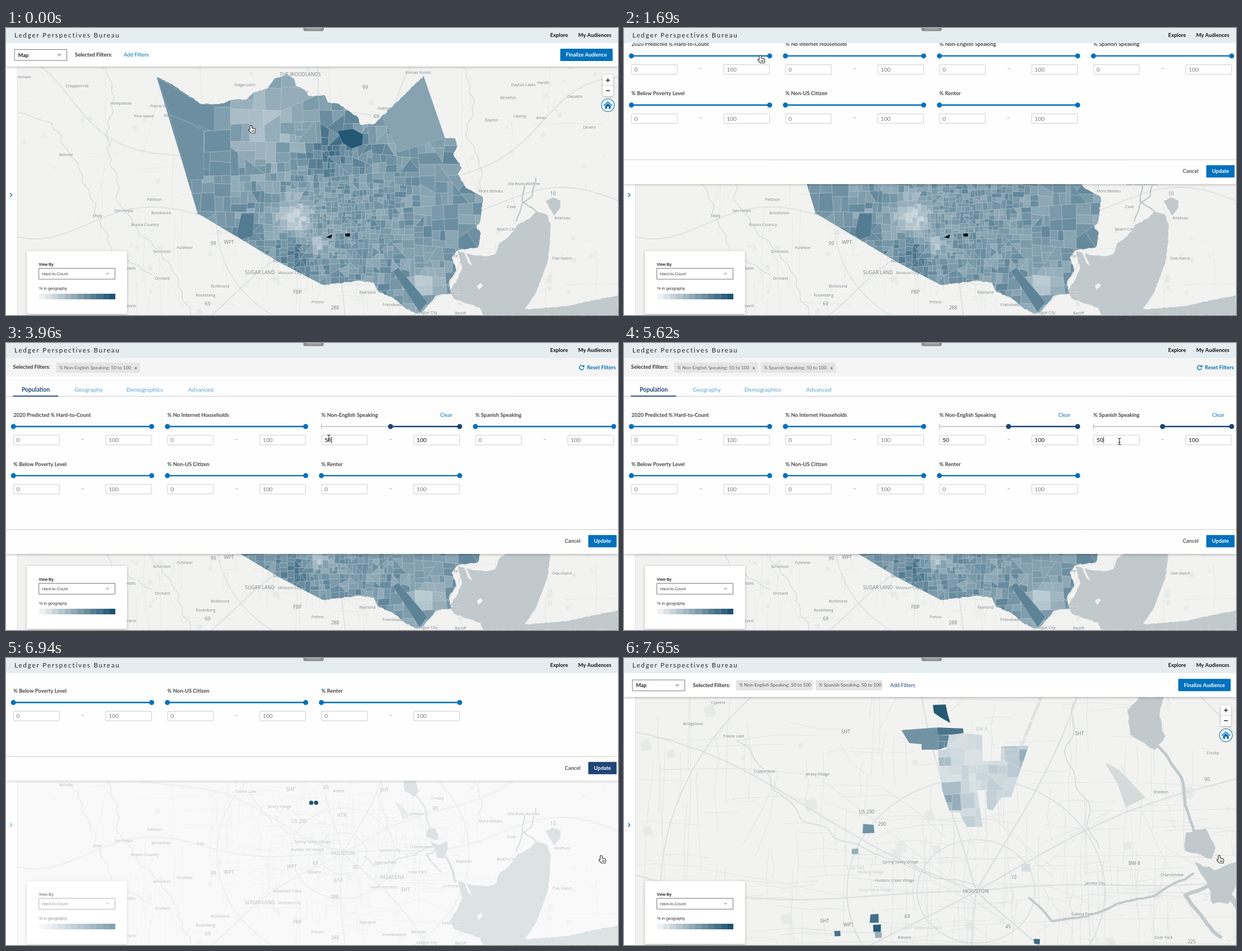
An HTML page with a canvas that plays this animation: 1092 by 513 pixels, repeating every 8000 ms.

```html
<!DOCTYPE html>
<html lang="en">
<head>
<meta charset="utf-8">
<title>Audience map</title>
<style>
html, body { margin: 0; width: 100%; height: 100%; overflow: hidden; background: #fff; }
canvas { display: block; width: 1092px; height: 513px; }
</style>
</head>
<body>
<canvas id="stage"></canvas>
<script>
const W = 1092, H = 513, LOOP = 8000, STEP = 145;
const BLUE = '#0071bc', NAVY = '#1f4478', WATER = '#c1c9cc', LAND = '#f2f3f1';
const LATO = 'Lato, sans-serif', MAPFONT = '"Open Sans", sans-serif', ARIAL = '"Liberation Sans", Arial, sans-serif';
const dpr = window.devicePixelRatio || 1;

function layer(canvas = document.createElement('canvas')) {
  canvas.width = W * dpr;
  canvas.height = H * dpr;
  const c = canvas.getContext('2d');
  c.scale(dpr, dpr);
  return c;
}
const g = layer(document.getElementById('stage'));

let seed = 7;
const rnd = () => (seed = (seed * 16807) % 2147483647) / 2147483647;
const jitter = a => (rnd() - 0.5) * 2 * a;
const pts = s => s.split(' ').map(p => p.split(',').map(Number));
const smooth = k => (k = Math.min(1, Math.max(0, k)), k * k * (3 - 2 * k));

function text(c, s, x, y, size, color, { weight = 400, family = LATO, align = 'left', space = 0 } = {}) {
  c.font = `${weight} ${size}px ${family}`;
  c.letterSpacing = space + 'px';
  c.textAlign = align;
  c.fillStyle = color;
  c.fillText(s, x, y + size * 0.36);
}
const bold = (s, x, y, color = '#333', align = 'left', size = 9.4) =>
  text(g, s, x, y, size, color, { weight: 700, align });

function rect(c, x, y, w, h, fill, stroke, r = 0) {
  c.beginPath();
  c.roundRect(x, y, w, h, r);
  if (fill) { c.fillStyle = fill; c.fill(); }
  if (stroke) { c.strokeStyle = stroke; c.lineWidth = 1; c.stroke(); }
}
function trace(c, p, close) {
  c.beginPath();
  p.forEach(([x, y]) => c.lineTo(x, y));
  if (close) c.closePath();
}
function line(c, p, color, width) {
  trace(c, p);
  c.strokeStyle = color;
  c.lineWidth = width;
  c.lineJoin = c.lineCap = 'round';
  c.stroke();
}
function area(c, p, fill, edge) {
  trace(c, p, true);
  c.fillStyle = fill;
  c.fill();
  if (edge) { c.strokeStyle = edge; c.lineWidth = 0.6; c.stroke(); }
}
function disc(c, x, y, r, fill) {
  c.beginPath();
  c.arc(x, y, r, 0, 7);
  c.fillStyle = fill;
  c.fill();
}
// Subdivides a polyline and shakes it so that it reads as a bank.
function rough(p, amp) {
  const out = [];
  for (let i = 1; i < p.length; i++) {
    const [a, b] = p[i - 1], [x, y] = p[i];
    const n = Math.max(1, Math.round(Math.hypot(x - a, y - b) / 4));
    for (let k = 0; k < n; k++) {
      const t = k / n, j = k ? amp : 0;
      out.push([a + (x - a) * t + jitter(j), b + (y - b) * t + jitter(j)]);
    }
  }
  out.push(p[p.length - 1]);
  return out;
}
const meander = (p, amp) => rough(p, 0.4).map(([x, y], i) =>
  [x + (Math.sin(i * 0.9) + Math.sin(i * 0.37)) * amp, y + Math.cos(i * 0.7) * amp * 0.5]);

function shade(v) {
  v = Math.min(1, Math.max(0, v));
  const a = [238, 241, 242], b = [31, 84, 112];
  return `rgb(${a.map((n, i) => Math.round(n + (b[i] - n) * v))})`;
}

// Places on the wide map. "+" shows only close up, "~" the same but faint, "-" only from afar.
const TOWNS = 'Brenham|30|87;Chappell Hill|127|103;Hempstead|205|134;Prairie View|276|139;Pine Island|246|157;Waller|292|156;Bellville|107|226;Sealy|163|335;San Felipe|210|326;Pattison|265|306;Brookshire|277|330;Katy|347|331;Brazos Country|248|351;Simonton|278|399;Fulshear|319|392;Wallis|222|429;Orchard|279|447;Richmond|382|461;Rosenberg|356|477;Missouri City|506|437;Fresno|556|489;Pearland|645|472;Friendswood|693|494;League City|751|508;Bacliff|811|509;Seabrook|793|473;Webster|737|489;East Bernard|210|496;'
  + 'Stagecoach|426|101;Preserve|525|113;Roman Forest|735|79;Oakhurst|678|143;Dayton Lakes|923|101;Hardin|959|97;Kenefick|896|124;Daisetta|1015|122;Dayton|866|164;Liberty|917|157;Ames|955|160;Devers|1041|177;Old River-Winfree|924|278;Mont Belvieu|865|291;Cove|902|319;Beach City|893|359;Anahuac|993|339;Oak Island|992|411;'
  + 'Crosby|770|250;Sheldon|733|278;Channelview|741|337;Jacinto City|686|343;Baytown|817|363;Galena Park|677|365;Deer Park|735|382;La Porte|793|407;South Houston|674|409;Meadows Place|502|416;Bellaire|550|382;-Bunker Hill Village|538|342;Spring Valley Village|547|328;Jersey Village|488|265;Towne Lake|428|238;-Aldine|594|237;'
  + '+Cypress|417|214;+Bridgeland|399|229;+Copperfield|450|263;+Hunters Creek Village|543|341;~Hedwig Village|526|335;~Piney Point Village|529|348;~West University Place|563|375';
const SIGNS = 'THE WOODLANDS|525|83;HOUSTON|601|349;SUGAR LAND|453|437;PASADENA|689|392;99|641|106;69|661|158;99|370|385;WPT|398|383;FBP|520|472;69|360|493;288|587|500;10|976|296;SHT|508|235;-45|571|231;SHT|675|236;-HTR|599|281;US 290|523|292;90|766|269;69|552|367;WPT|510|373;45|624|374;-610|593|398;288|586|427;SHT|713|414;+290|534|301;+10|628|339;+BW 8|714|329;~BW 8|605|233;~I-10 Toll|515|332;+SHT|493|370;+225|755|385';

// One geography drawn at any zoom around the city centre.
function drawMap(zoom) {
  seed = 7;
  const c = layer(), k = (zoom - 1) / 1.5, close = zoom > 1;
  const hub = [601, 349], at = [601 + 27 * k, 349 + 68 * k];
  const px = (1 + k * 0.3) / zoom;
  c.fillStyle = LAND;
  c.fillRect(0, 0, W, H);
  c.save();
  c.translate(...at);
  c.scale(zoom, zoom);
  c.translate(-hub[0], -hub[1]);

  for (let i = 0; i < 110; i++) {
    const x = rnd() * W, y = 70 + rnd() * 440, s = 2 + rnd() * 6;
    area(c, [[x, y], [x + s, y - s / 3], [x + s * 1.3, y + s * 0.8], [x + s * 0.2, y + s]], '#e7eae8');
  }
  for (let i = 0; i < 420; i++) {
    const spread = i % 4 ? 260 : 620, reach = (i % 4 ? 22 : 60) * (0.4 + rnd());
    const x = hub[0] + (rnd() + rnd() - 1) * spread, y = hub[1] + (rnd() + rnd() - 1) * spread * 0.6;
    const turn = rnd() < 0.85 ? Math.round(rnd()) * Math.PI / 2 + jitter(0.07) : rnd() * 3;
    const dx = Math.cos(turn) * reach, dy = Math.sin(turn) * reach;
    line(c, [[x - dx, y - dy], [x + jitter(3), y + jitter(3)], [x + dx, y + dy]], '#e2e5e5', 0.8 * px);
  }
  for (const angle of [3.16, -2.73, -1.8, -1.1, -0.45, -0.1, 0.78, 1.6, 2.6]) {
    const road = [];
    for (let r = 0; r < 640; r += 20) {
      const a = angle + 0.07 * Math.sin(r / 70 + angle * 5);
      road.push([hub[0] + Math.cos(a) * r, hub[1] + Math.sin(a) * r]);
    }
    line(c, road, '#d5dadb', 1.8 * px);
    line(c, road, '#eceeed', 0.6 * px);
  }
  for (const r of [42, 92, 225]) {
    c.beginPath();
    c.ellipse(hub[0], hub[1], r, r * 0.88, 0, 0, 7);
    c.strokeStyle = '#dbdfe0';
    c.lineWidth = 1.4 * px;
    c.stroke();
  }

  ['172,68 193,110 185,165 180,215 197,265 200,310 236,362 292,420 330,513', '20,150 80,170 130,250 190,400 260,440',
    '815,68 835,130 822,190 850,250 842,290', '430,240 480,300 560,335 600,345', '670,200 668,260 690,320']
    .forEach(p => line(c, meander(pts(p), 2.2), '#cfd6d8', 1.1 * px));
  area(c, rough(pts('806,398 832,406 858,408 873,404 880,385 899,371 912,352 935,340 946,328 965,333 972,352 970,390 966,420 944,476 926,503 1000,497 1092,478 1092,513 852,513 846,500 799,484 791,470 804,452 814,430 806,398'), 0.9), WATER);
  area(c, rough(pts('963,309 975,303 989,308 989,322 977,335 963,309'), 0.8), WATER);
  area(c, rough(pts('709,220 718,210 735,210 732,224 736,238 729,248 711,237 709,220'), 0.8), WATER);
  area(c, rough(pts('751,307 765,304 772,318 769,326 750,320 751,307'), 0.8), WATER);
  area(c, rough(pts('757,328 771,334 787,328 787,344 781,358 770,358 766,343 757,328'), 1.2), WATER);
  [['730,244 747,267 751,284 756,306', 2], ['756,336 728,352 702,358 680,367 656,370 640,354', 1.6], ['766,345 750,352 766,372 776,382', 2.6],
    ['780,350 792,368 803,400', 4], ['945,268 938,300 922,315 910,345', 2.4], ['925,280 920,310 940,322 950,332', 2.4]]
    .forEach(([p, w]) => line(c, meander(pts(p), 0.7), WATER, w));
  area(c, pts('816,397 822,404 832,425 825,420'), LAND);
  area(c, pts('840,461 847,456 851,460 844,468'), LAND);
  area(c, pts('693,257 703,262 722,282 708,289 702,272'), '#d5dbda');
  c.restore();

  const put = (list, size, color) => list.split(';').forEach(item => {
    const [, mark, name, x, y] = item.match(/^([-+~]?)(.*)\|(.*)\|(.*)$/);
    if (mark && close === (mark === '-')) return;
    const lx = at[0] + (x - hub[0]) * zoom, ly = at[1] + (y - hub[1]) * zoom;
    const s = name === 'HOUSTON' ? size + k : size;
    c.font = `400 ${s}px ${MAPFONT}`;
    c.textAlign = 'center';
    c.strokeStyle = 'rgba(246,247,245,.7)';
    c.lineWidth = 1.4;
    c.strokeText(name, lx, ly + s * 0.36);
    text(c, name, lx, ly, s, mark === '~' ? '#bfc5c8' : color, { family: MAPFONT, align: 'center' });
  });
  put(TOWNS, 7, '#788188');
  put(SIGNS, 8.6, '#747c81');
  return c;
}

// Recursive cuts turn an outline into census tracts.
function cut(poly, px, py, nx, ny) {
  const sides = [[], []];
  poly.forEach((a, i) => {
    const b = poly[(i + 1) % poly.length];
    const da = (a[0] - px) * nx + (a[1] - py) * ny, db = (b[0] - px) * nx + (b[1] - py) * ny;
    sides[da >= 0 ? 0 : 1].push(a);
    if (da * db < 0) {
      const t = da / (da - db), m = [a[0] + (b[0] - a[0]) * t, a[1] + (b[1] - a[1]) * t];
      sides[0].push(m);
      sides[1].push(m);
    }
  });
  return sides;
}
function tracts(c, poly, size, value) {
  let sum = 0, cx = 0, cy = 0, long = 0, dir = 0;
  poly.forEach(([x, y], i) => {
    const [u, v] = poly[(i + 1) % poly.length];
    sum += x * v - u * y;
    cx += x / poly.length;
    cy += y / poly.length;
    for (const [p, q] of poly) {
      const d = Math.hypot(p - x, q - y);
      if (d > long) { long = d; dir = Math.atan2(q - y, p - x); }
    }
  });
  const side = size(cx, cy) * (0.7 + rnd() * 0.65);
  if (Math.abs(sum) / 2 < side * side) {
    area(c, poly, shade(value(cx, cy)), 'rgba(215,225,230,.5)');
    return;
  }
  const grid = Math.round(dir / (Math.PI / 2)) * Math.PI / 2 + jitter(0.1);
  const a = rnd() < 0.88 ? grid : dir + jitter(0.25), off = jitter(long * 0.1);
  cut(poly, cx + Math.cos(a) * off, cy + Math.sin(a) * off, Math.cos(a), Math.sin(a))
    .forEach(p => p.length > 2 && tracts(c, p, size, value));
}
// Sum of soft spots, each given as x, y, radius, weight.
const spots = (x, y, list) => list.reduce((v, [a, b, r, k]) => v + k * Math.exp(-((x - a) ** 2 + (y - b) ** 2) / (r * r)), 0);
const clipTo = (c, p) => { trace(c, p, true); c.clip(); };

function drawCounty() {
  const c = layer();
  seed = 11;
  const north = rough(pts('269,88 297,101 318,116 348,136 380,136 412,127 428,128 441,116 467,108 478,92 501,83 514,91 518,104 532,110 540,122 568,120 574,133 592,135 628,160 632,173 656,172 690,140 745,86'), 0.9);
  const coast = rough(pts('783,196 801,197 805,211 798,226 813,250 806,262 820,285 851,303 846,345 839,356 847,368 842,392 806,397 795,410 803,432 790,455 794,474 768,478 744,506 732,510 712,500 690,482 664,471 656,455 625,452 565,459'), 1);
  clipTo(c, [...north, ...coast, [490, 420], [342, 331]]);
  c.fillStyle = '#819eae';
  c.fillRect(0, 0, W, H);
  const warm = [[580, 215, 45, 0.2], [520, 395, 40, 0.15], [515, 340, 32, -0.4], [555, 384, 18, -0.34], [460, 175, 70, -0.2], [745, 460, 24, -0.26]];
  tracts(c, pts('260,75 860,75 860,513 260,513'),
    (x, y) => 9.5 + ((x - 590) ** 2 * 0.7 + (y - 350) ** 2) / 2200,
    (x, y) => 0.56 + jitter(0.12) + spots(x, y, warm));
  [['269,88 348,136 372,137 372,186 322,167 292,155', 0.63], ['292,155 322,167 353,184 353,271 324,271', 0.62],
    ['745,86 783,196 700,222 672,160 690,140', 0.5], ['591,184 618,180 637,190 636,209 616,216 600,205', 0.98],
    ['420,331 443,331 441,372 420,378 411,370', 0.75], ['690,435 700,428 752,490 738,508', 0.7]]
    .forEach(([p, v]) => area(c, pts(p), shade(v), 'rgba(215,225,230,.5)'));
  ['571,374 582,369 580,376', '605,368 614,367 613,373 606,372'].forEach(p => area(c, pts(p), '#000'));
  return c.canvas;
}

function drawResult() {
  const c = drawMap(2.5);
  seed = 5;
  c.save();
  c.translate(727, 113);
  c.rotate(-1.19);
  text(c, 'STEX FREEWAY FRONTAGE RD', 0, 0, 7, '#b4babd', { family: MAPFONT, align: 'center' });
  c.restore();
  const block = (outline, size, value) => {
    const p = pts(outline), xs = p.map(q => q[0]), ys = p.map(q => q[1]);
    const [l, r, t, b] = [Math.min(...xs), Math.max(...xs), Math.min(...ys), Math.max(...ys)];
    c.save();
    clipTo(c, p);
    tracts(c, [[l, t], [r, t], [r, b], [l, b]], () => size, value);
    c.restore();
  };
  block('551,84 574,83 577,98 582,116 566,107 553,98', 90, () => 0.97);
  block('495,129 561,124 561,164 531,164 531,154 509,152', 90, () => 0.6);
  block('559,124 605,126 606,136 560,138', 90, () => 0.8);
  block('561,138 580,138 587,155 561,164', 17, () => 0.68);
  block('560,165 575,163 580,138 606,134 639,138 640,184 672,184 673,158 722,157 691,248 672,250 658,272 648,270 646,235 630,237 640,302 612,302 598,276 582,276 568,237 562,190', 25,
    (x, y) => 0.17 + jitter(0.07) + spots(x, y, [[583, 248, 20, 0.45], [712, 178, 24, 0.22], [575, 184, 18, 0.24], [595, 155, 20, -0.15], [583, 215, 20, -0.14]]));
  // x, y, size, value
  [[436, 306, 19, 0.6], [412, 346, 12, 0.42], [717, 375, 17, 0.12], [447, 465, 17, 0.82], [451, 483, 14, 0.95], [454, 495, 11, 0.42], [381, 493, 11, 0.8], [737, 507, 11, 0.86]]
    .forEach(([x, y, s, v]) => {
      const corner = (a, b) => [x + a * s / 2 + jitter(s / 12), y + b * s * 0.42 + jitter(s / 12)];
      area(c, [corner(-1, -1), corner(1, -1), corner(1, 1), corner(-1, 1)], shade(v));
    });
  return c.canvas;
}

const region = drawMap(1).canvas, between = drawMap(1.6).canvas, county = drawCounty(), result = drawResult();

const caretDown = (x, y, s) => area(g, [[x - s, y - s / 2], [x + s, y - s / 2], [x, y + s * 0.6]], '#bbb');
function shadow(on, blur = 4) {
  g.shadowColor = on ? 'rgba(0,0,0,.3)' : 'transparent';
  g.shadowBlur = on ? blur * dpr : 0;
  g.shadowOffsetY = on ? dpr : 0;
}
function drawStage(t) {
  g.drawImage(t >= 7650 ? result : t >= 7320 ? between : region, 0, 0, W, H);
  if (t < 6790) g.drawImage(county, 0, 0, W, H);
  rect(g, 0, 60, 20, H, '#fff');
  line(g, [[20.2, 60], [20.2, H]], '#dfe2e3', 1);
  line(g, pts('7.8,295.8 10.6,298.5 7.8,301.2'), BLUE, 1.5);

  shadow(true);
  rect(g, 37, 398.5, 179, 112.5, '#fff', null, 2);
  rect(g, 1065, 84, 18, 37.5, '#fff', null, 2);
  shadow(false);
  const sans = { family: ARIAL };
  text(g, 'View By', 58.5, 423, 6.9, '#222', { ...sans, weight: 700 });
  rect(g, 59, 429.5, 135.5, 19.5, '#fff', '#777');
  text(g, 'Hard-to-Count', 64, 439.5, 7.3, '#444', sans);
  caretDown(181, 439.5, 3.5);
  text(g, '% in geography', 59, 465, 7.2, '#333', sans);
  for (let i = 0; i < 12; i++) rect(g, 59 + i * 11.33, 475, 11.5, 10, shade(i / 11));

  line(g, [[1065, 102.7], [1083, 102.7]], '#ccc', 1);
  for (const y of [93.5, 112]) line(g, [[1071, y], [1077, y]], '#222', 1.4);
  line(g, [[1074, 90.5], [1074, 96.5]], '#222', 1.4);
  disc(g, 1074, 138, 12, BLUE);
  disc(g, 1074, 138, 10.9, '#fff');
  area(g, pts('1069,139 1074,134.3 1079,139 1079,144.5 1075.5,144.5 1075.5,140.5 1072.5,140.5 1072.5,144.5 1069,144.5'), BLUE);
  line(g, pts('1066.8,138.6 1074,132 1081.2,138.6'), BLUE, 1.5);

  if (t >= 6790 && t < 7320) {
    g.fillStyle = 'rgba(255,255,255,.45)';
    g.fillRect(0, 69, W, H);
    for (const x of [544.7, 553.3]) disc(g, x, 258.8, 3.8, '#1f5673');
  }
}

const CHIPS = ['% Non-English Speaking: 50 to 100', '% Spanish Speaking: 50 to 100'];
function chip(s, x, y, w, ink) {
  rect(g, x, y, w, 18.3, '#e5e5e5', null, 2);
  text(g, s, x + 5.6, y + 9, 8.3, ink);
}
function drawBar(t) {
  const done = t >= 7090, d = done ? 0.7 : 0;
  shadow(true);
  rect(g, 0, 27, W, 42 + d, '#fff');
  shadow(false);
  rect(g, 15.5, 38.5 + d, 93, 19.5, '#fff', '#777');
  bold('Map', 21.5, 48.3 + d, '#222');
  caretDown(95, 48.5 + d, 4.5);
  bold('Selected Filters:', 123, 47.8 + d);
  if (done) {
    chip(CHIPS[0], 200, 39.5, 137, '#555');
    chip(CHIPS[1], 342, 39.5, 119, '#555');
  }
  text(g, 'Add Filters', done ? 475 : 210, 47.8 + d, 9.4, done || t >= 1090 ? NAVY : BLUE);
  rect(g, 989, 37 + d / 2, 93.5, 22, BLUE, null, 1);
  bold('Finalize Audience', 1035.6, 48 + d / 2, '#fff', 'center');
}

function filter(name, x, y, { active = false, from = '0', low = 0, caret = false } = {}) {
  const end = x + 246.7, start = x + 246.7 * low / 100, color = active ? NAVY : BLUE, ink = active ? '#111' : '#777';
  const s = y + 20.8;
  bold(name, x, y, '#444');
  if (active) text(g, 'Clear', x + 212, y, 9.4, BLUE);
  line(g, [[x, s], [end, s]], '#c8c8c8', 2);
  line(g, [[x, s - 4.5], [x, s + 4.5]], '#bbb', 1.2);
  line(g, [[start, s], [end, s]], color, 2.4);
  disc(g, start, s, 4.5, color);
  disc(g, end, s, 4.5, color);
  for (const box of [x + 0.3, x + 164.9]) rect(g, box, y + 36.5, 81.7, 17, '#fff', '#ccc', 1);
  text(g, from, x + 5.4, y + 45, 10.2, ink);
  if (caret) {
    const cx = x + 6.4 + g.measureText(from).width;
    line(g, [[cx, y + 39.5], [cx, y + 50.5]], '#111', 0.9);
  }
  text(g, '100', x + 170, y + 45, 10.2, ink);
  text(g, '–', x + 123.5, y + 43, 9.4, '#666', { align: 'center' });
}
const FILTERS = ['2020 Predicted % Hard-to-Count', '% No Internet Households', '% Non-English Speaking', '% Spanish Speaking',
  '% Below Poverty Level', '% Non-US Citizen', '% Renter'];
function drawPanel(t, dy) {
  const chips = t >= 5620 ? 2 : t >= 3960 ? 1 : 0, d = chips ? 1.5 : 0;
  g.save();
  g.translate(0, dy);
  shadow(true, 5);
  rect(g, 0, 27, W, 350, '#fefefe');
  shadow(false);
  rect(g, 0, 27, W, 31.5 + d, '#f5f5f5');
  bold('Selected Filters:', 12.5, 42.3);
  [[89.5, 149.5], [244, 134]].slice(0, chips).forEach(([x, w], i) => {
    chip(CHIPS[i], x, 35, w, '#666');
    text(g, 'x', x + w - 7.5, 44, 8.3, '#333', { align: 'center' });
  });
  g.beginPath();
  g.arc(1027, 44, 3.8, 0.5, 5.4);
  g.strokeStyle = BLUE;
  g.lineWidth = 1.5;
  g.stroke();
  area(g, pts('1032,39 1032,43.2 1027.8,43.2'), BLUE);
  bold('Reset Filters', 1036.5, 43.3, BLUE);

  bold('Population', 53, 81.3 + d, NAVY, 'center', 10.4);
  ['Geography', 'Demographics', 'Advanced'].forEach((s, i) =>
    text(g, s, 147.5 + i * 100, 81.3 + d, 10.4, '#5ba1d3', { align: 'center' }));
  line(g, [[0, 93.8 + d], [W, 93.8 + d]], '#c9c9c9', 1);
  line(g, [[13, 93.4 + d], [92.5, 93.4 + d]], NAVY, 1.6);

  const states = {
    2: t >= 3220 && {
      active: true, from: chips ? '50' : '', low: chips ? 50 : 0, caret: t < 3660 || (t >= 3960 && t < 4880)
    },
    3: t >= 4880 && {
      active: true, from: '50'.slice(0, t < 5320 ? 0 : t < 5470 ? 1 : 2), low: chips > 1 ? 50 : 0, caret: t < 6350
    }
  };
  FILTERS.forEach((name, i) =>
    filter(name, 13.2 + (i % 4) * 274.8, 127 + d + Math.floor(i / 4) * 87.8, states[i] || {}));

  line(g, [[0, 333.5], [W, 333.5]], '#ccc', 1);
  bold('Cancel', 1011, 354, '#555', 'center');
  rect(g, 1039, 343.2, 50.5, 22, t >= 6210 ? NAVY : BLUE, null, 1);
  bold('Update', 1064.3, 354, '#fff', 'center');
  g.restore();
}
function drawHeader() {
  rect(g, 0, 0, W, 27, '#e6edf0');
  rect(g, 530.5, -4, 36.5, 9.5, '#8c8f90', null, 3);
  line(g, [[537, 1.5], [561, 1.5]], '#d5d8d9', 0.8);
  text(g, 'Ledger Perspectives Bureau', 15, 13, 11.6, '#222', { space: 1.85 });
  bold('Explore', 971, 12.5, '#111');
  bold('My Audiences', 1021, 12.5, '#111');
}

const HAND = new Path2D('M-3-5.3q1.2-1.4 2.4 0v3.6l4.4 1q1.6.5 1.4 2l-.9 4.5h-5.4l-4-4.6q.3-1.4 2.1-.4z');
const CREASES = new Path2D('M-.2 1.5v2.8M1.4 1.5v2.8M3 1.5v2.8');
const ARROW = new Path2D('M0 0v12l2.8-2.6 2 4.4 2-.9-2-4.2h3.8z');
const BEAM = new Path2D('M-2.4-6q2.4 0 2.4 1.5v9q0 1.5-2.4 1.5M2.4-6q-2.4 0-2.4 1.5M0 4.5q0 1.5 2.4 1.5M-1.2 1.5h2.4');
// start, end, target x, y
const MOVES = [[590, 1090, 245, 56], [2140, 2440, 1012, 343], [2590, 2780, 576, 162], [2930, 2930, 576, 170], [4260, 4710, 884, 176], [5910, 6350, 1064, 360]];

function drawPointer(t) {
  let x = 439, y = 181;
  for (const [start, end, tx, ty] of MOVES) {
    if (t < start) break;
    const done = Math.floor((t - start) / STEP) + 1, all = Math.floor((end - start) / STEP) + 1;
    const k = smooth(done / all);
    x += (tx - x) * k;
    y += (ty - y) * k;
  }
  const shape = t < 2140 || t >= 6210 ? HAND : (t >= 2930 && t < 4410) || (t >= 4710 && t < 5910) ? BEAM : ARROW;
  g.save();
  g.translate(x, y);
  g.lineJoin = 'round';
  const stroke = (path, color, width) => { g.strokeStyle = color; g.lineWidth = width; g.stroke(path); };
  if (shape === HAND) {
    g.scale(1.1, 1.1);
    stroke(HAND, '#111', 1.8);
    g.fillStyle = '#fff';
    g.fill(HAND);
    stroke(CREASES, '#222', 0.7);
  } else {
    stroke(shape, '#fff', 1.8);
    g.fillStyle = '#000';
    if (shape === ARROW) g.fill(shape);
    else stroke(shape, '#111', 1);
  }
  g.restore();
}

function panelOffset(t) {
  if (t < 1540 || t >= 7090) return null;
  const held = start => start + Math.floor((t - start) / 150) * 150;
  if (t < 6790) return -350 * (1 - smooth((held(1540) - 1475) / 330));
  return -350 * smooth((held(6790) - 6800) / 300);
}
function frame(t) {
  const dy = panelOffset(t);
  g.clearRect(0, 0, W, H);
  drawStage(t);
  drawBar(t);
  if (dy !== null) drawPanel(t, dy);
  drawHeader();
  drawPointer(t);
}
const begin = performance.now();
(function tick() {
  frame((performance.now() - begin) % LOOP);
  requestAnimationFrame(tick);
})();
</script>
</body>
</html>
```
